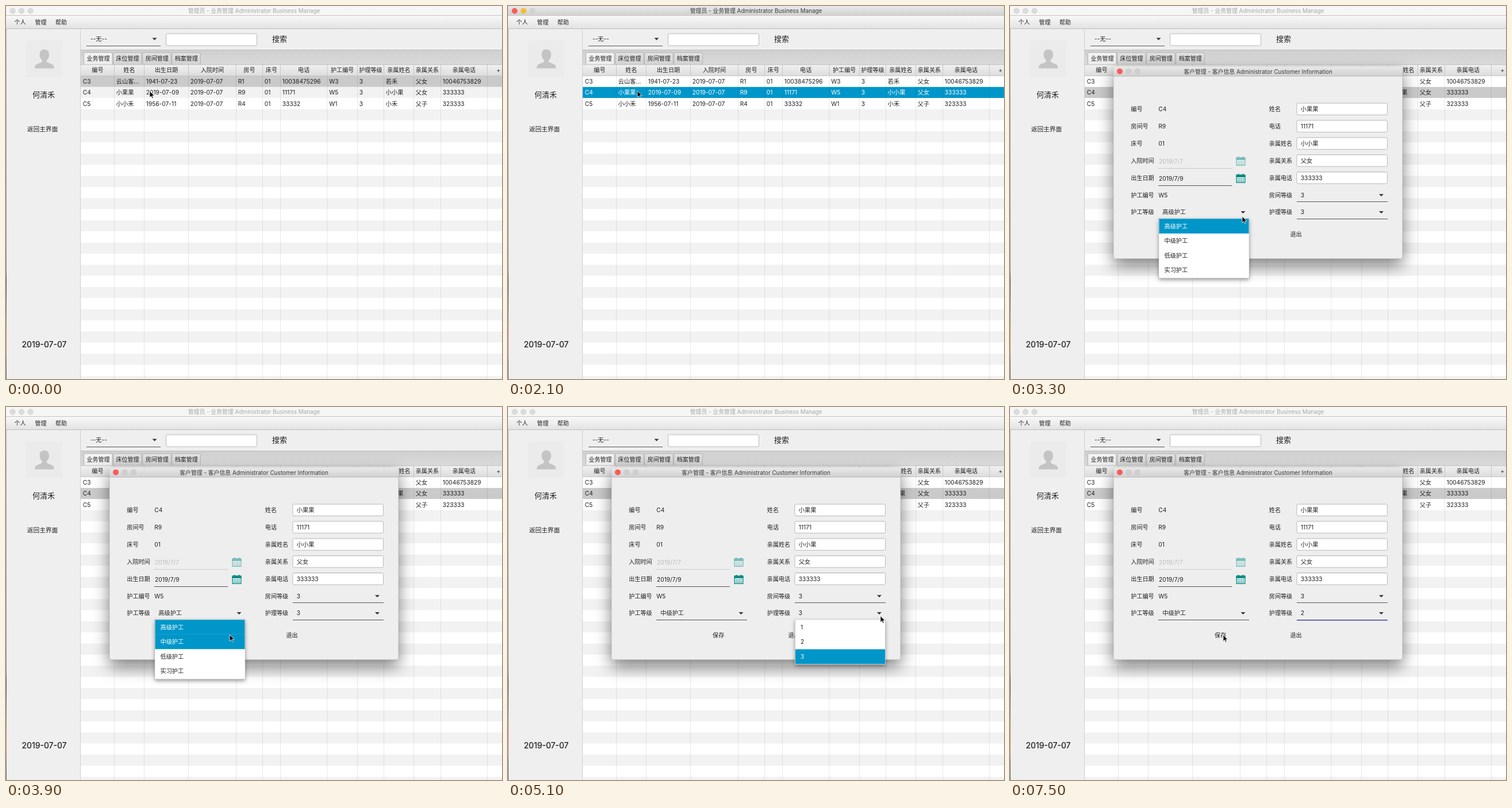
Recreate the animation shown at these times as an HTML page. Size 863 px wide and 649 px high, loop 8 s.

```html
<!DOCTYPE html>
<html lang="zh-CN">
<head>
<meta charset="utf-8">
<title>业务管理</title>
<style>
html, body { margin: 0; width: 100%; height: 100%; overflow: hidden; background: #efefef; }
svg { display: block; width: 863px; height: 649px; }
text { font-family: Inter, "Noto Sans CJK SC", "Noto Sans CJK", sans-serif; white-space: pre; }
</style>
</head>
<body>
<svg id="stage" viewBox="0 0 863 649" xmlns="http://www.w3.org/2000/svg"></svg>
<script>
const INK = '#1f1f1f', BLUE = '#0096c9', GREY = '#cacaca';
const FOCUS = '#3f4aa5', LINE = '#555';

// Drawing helpers; text is placed by its vertical centre.
const rect = (x, y, w, h, fill, extra = '') =>
  `<rect x="${x}" y="${y}" width="${w}" height="${h}" fill="${fill}" ${extra}/>`;
const text = (x, y, str, size = 10.2, extra = '') =>
  `<text x="${x}" y="${y + size * 0.365}" font-size="${size}" ${extra}>${str}</text>`;
const mid = (x, y, str, size, extra = '') =>
  text(x, y, str, size, `text-anchor="middle" ${extra}`);
const dot = (x, y, fill, extra = '') =>
  `<circle cx="${x}" cy="${y}" r="4.7" fill="${fill}" ${extra}/>`;
const arrow = (x, y) => `<path d="M${x - 4} ${y - 2}h8l-4 4z" fill="#333"/>`;
const underline = (x, y, w, id = '', color = LINE) =>
  rect(x, y, w, 1, color, id && `id="${id}"`);
const fade = (id, from, to) =>
  `<linearGradient id="${id}" x2="0" y2="1"><stop stop-color="${from}"/><stop offset="1" stop-color="${to}"/></linearGradient>`;
const field = (x, y, w, h) =>
  rect(x + .5, y + .5, w - 1, h - 1, '#fff', 'rx="2" stroke="#b9b9b9"') +
  rect(x + 1.5, y + 1, w - 3, 1, '#e6e6e6');

const defs = `<defs>
  ${fade('barOn', '#e9e9e9', '#d0d0d0')}
  ${fade('menu', '#f8f8f8', '#e2e2e2')}
  ${fade('tabs', '#cfcfcf', '#dadada')}
  ${fade('tab', '#e2e2e2', '#d2d2d2')}
  ${fade('tabOn', '#f4f4f4', '#ececec')}
  ${fade('head', '#f1f1f1', '#dcdcdc')}
  <linearGradient id="edge" x2="0" y2="1">
    <stop stop-color="#b4b4b4"/><stop offset=".69" stop-color="#8c8c8c"/>
    <stop offset=".72" stop-color="#4a4a4a"/><stop offset=".82" stop-color="#8c8078"/>
    <stop offset=".86" stop-color="#d9764f"/><stop offset=".92" stop-color="#c98a70"/>
    <stop offset=".95" stop-color="#777"/><stop offset="1" stop-color="#666"/>
  </linearGradient>
  <filter id="deep" x="-20%" y="-20%" width="140%" height="150%">
    <feDropShadow dx="0" dy="12" stdDeviation="14" flood-opacity=".5"/>
  </filter>
  <filter id="soft" x="-10%" y="-10%" width="120%" height="130%">
    <feDropShadow dx="0" dy="3" stdDeviation="3.5" flood-opacity=".4"/>
  </filter>
</defs>`;

const titleBar = () =>
  rect(0, 0, 863, 17, '#f6f6f6', 'id="bar"') +
  [11.5, 27, 42.5].map((x, i) => dot(x, 8.5, '#dcdcdc', `id="light${i}" stroke="#cdcdcd" stroke-width=".6"`)).join('') +
  mid(431.5, 8.7, '管理员 - 业务管理 Administrator Business Manage', 9.9, 'id="title"') +
  rect(0, 16, 863, 1, '#c4c4c4') +
  rect(0, 17, 863, 23, 'url(#menu)') + rect(0, 39, 863, 1, '#bdbdbd') +
  text(14.5, 28.5, '个人', 10) + text(50.5, 28.5, '管理', 10) + text(86, 28.5, '帮助', 10);

const sidebar = () =>
  rect(35, 60, 63, 63.5, '#ebebeb') +
  `<path fill="#c4c4c4" d="M50 108.500C50 102 53 101.500 58 99.500C62 98 63 97 63 94.500
    C60 92 58.500 88.500 58.500 84.500C58.500 78.500 62 75.500 66.700 75.500C71.500 75.500 75 78.500 75 84.500
    C75 88.500 73.500 92 70.500 94.500C70.500 97 71.500 98 75.500 99.500C80.500 101.500 83.500 102 83.500 108.500Z"/>` +
  mid(65.500, 154.500, '何清禾', 13) +
  mid(63.500, 214.300, '返回主界面', 10.7) +
  mid(66.500, 589, '2019-07-07', 14.1, 'stroke="#1f1f1f" stroke-width=".2"') +
  rect(129, 40, 1, 609, '#cfcfcf') +
  rect(0, 40, 1, 609, 'url(#edge)');

const toolbar = () =>
  text(147, 57.3, '--无--') + arrow(258.5, 57.500) + underline(140, 69, 129) +
  field(278, 47.500, 159, 22) + mid(476, 57.300, '搜索', 13) +
  rect(130, 76, 733, 26, 'url(#tabs)') + rect(130, 76, 733, 1, '#bcbcbc') +
  ['业务管理', '床位管理', '房间管理', '档案管理'].map((name, i) => {
    const x = 135.500 + i * 51.100;
    return `<path d="M${x} 102v-19q0-2 2-2h45.500q2 0 2 2v19" fill="url(#${i ? 'tab' : 'tabOn'})" stroke="#b2b2b2"/>` +
      mid(x + 25, 91.200, name, 10);
  }).join('');

const cols = [130, 188, 240, 317, 400, 446, 477, 558.500, 611, 657, 709, 756, 837, 876];
const heads = ['编号', '姓名', '出生日期', '入院时间', '房号', '床号', '电话', '护工编号',
  '护理等级', '亲属姓名', '亲属关系', '亲属电话', '+'];
const people = [
  ['C3', '云山客...', '1941-07-23', '2019-07-07', 'R1', '01', '10038475296', 'W3', '3', '若禾', '父女', '10046753829'],
  ['C4', '小果果', '2019-07-09', '2019-07-07', 'R9', '01', '11171', 'W5', '3', '小小果', '父女', '333333'],
  ['C5', '小小禾', '1956-07-11', '2019-07-07', 'R4', '01', '33332', 'W1', '3', '小禾', '父子', '323333']
];
const PITCH = 19.34, TOP = 121.500;
const rowFill = i => i % 2 ? '#f2f2f2' : '#fff';

function table() {
  let out = rect(130, 121, 733, 528, '#fff');
  for (let i = 0; i < 28; i++) {
    out += rect(130, TOP + i * PITCH, 733, PITCH, rowFill(i), `id="row${i}"`);
  }
  cols.slice(1, 13).forEach(x => out += rect(x, TOP, 1, 528, '#000', 'opacity=".085"'));
  people.forEach((cells, i) => {
    const y = 131.300 + i * PITCH;
    out += `<g id="cells${i}">` + cells.map((s, c) => text(cols[c] + 3.800, y, s)).join('') + '</g>';
  });
  out += rect(130, 102, 733, 20, 'url(#head)') + rect(130, 101.500, 733, 1, '#bdbdbd') + rect(130, 121, 733, 1, '#c6c6c6');
  heads.forEach((s, c) => {
    out += mid((cols[c] + cols[c + 1]) / 2 + .4, 111.500, s, 10.1) + rect(cols[c + 1], 102, 1, 19, '#c6c6c6');
  });
  return out;
}

function calendar(x, y, opacity) {
  let out = `<g transform="translate(${x} ${y})" opacity="${opacity}">` +
    rect(.7, 2.200, 14.600, 13.100, '#fff', 'stroke="#078a86" stroke-width="1.400"') +
    rect(0, 1.500, 16, 4.500, '#078a86') + rect(3, 0, 2, 3, '#078a86') + rect(11, 0, 2, 3, '#078a86');
  for (let i = 0; i < 12; i++) out += rect(2.700 + i % 4 * 2.900, 7.500 + (i / 4 | 0) * 2.500, 1.800, 1.500, '#078a86');
  return out + '</g>';
}

function dialog() {
  const left = [['编号', 'C4'], ['房间号', 'R9'], ['床号', '01'], ['入院时间'], ['出生日期'], ['护工编号', 'W5'], ['护工等级']];
  const right = [['姓名', '小果果'], ['电话', '11171'], ['亲属姓名', '小小果'], ['亲属关系', '父女'], ['亲属电话', '333333'], ['房间等级'], ['护理等级']];
  const rowY = i => 179.400 + i * 29.900;
  let out = '<g id="dialog">' +
    rect(180, 105, 503, 335, '#eee', 'rx="4" filter="url(#deep)"') +
    rect(180, 105, 503, 334.500, '#eee', 'rx="4" stroke="#a8a8a8" stroke-width=".6"') +
    '<path d="M180 122v-13q0-4 4-4h495q4 0 4 4v13z" fill="url(#barOn)"/>' +
    rect(180, 121.500, 503, 1, '#b8b8b8') +
    dot(191, 113.600, '#fc5b57', 'stroke="#e2463f" stroke-width=".5"') +
    dot(206.500, 113.600, '#cfcfcf', 'stroke="#bdbdbd" stroke-width=".5"') +
    dot(222, 113.600, '#cfcfcf', 'stroke="#bdbdbd" stroke-width=".5"') +
    mid(431.500, 113.900, '客户管理 - 客户信息 Administrator Customer Information', 9.900, 'fill="#3a3a3a"');
  left.forEach(([label, value], i) => {
    out += text(210.300, rowY(i), label, 10.100) + (value ? text(258.300, rowY(i), value) : '');
  });
  right.forEach(([label, value], i) => {
    out += text(450.800, rowY(i), label, 10.100);
    if (value) out += field(498.500, rowY(i) - 10.900, 158.500, 21.500) + text(505.800, rowY(i), value);
  });
  out += text(259, 270, '2019/7/7', 10.200, 'fill="#bdbdbd"') + underline(258, 282, 128, '', '#c9c9c9') + calendar(393.500, 262, .5) +
    text(259, 300, '2019/7/9') + underline(258, 312, 128) + calendar(393.500, 292, 1) +
    text(265.300, 358.700, '', 10.200, 'id="staff"') + arrow(405.500, 359) + underline(258, 370, 158, 'staffLine') +
    text(505.800, 329.200, '3') + arrow(646, 329.300) + underline(499, 340, 158) +
    text(505.800, 358.700, '', 10.200, 'id="care"') + arrow(646, 359) + underline(499, 370, 158, 'careLine') +
    rect(342.500, 384, 47.500, 27, '#c8c8c8', 'id="save" rx="2"') +
    mid(366.200, 397.500, '保存', 10.100) + mid(497.500, 397.500, '退出', 10.100);
  return out + '</g>';
}

function popup(id, x, items) {
  const h = items.length * 25.600 + 1;
  return `<g id="${id}">` + rect(x, 370, 157, h, '#fff', 'filter="url(#soft)"') +
    rect(x, 370, 157, h, '#fff', 'stroke="#bcbcbc" stroke-width=".8"') +
    items.map((s, i) => rect(x + .5, 370.300 + i * 25.600, 156, 25.600, '#fff', `id="${id}Bg${i}"`) +
      text(x + 9.500, 382.800 + i * 25.500, s, 10.200, `id="${id}Tx${i}"`)).join('') + '</g>';
}

const stage = document.getElementById('stage');
stage.innerHTML = defs + rect(0, 0, 863, 649, '#efefef') + `<g fill="${INK}">` +
  toolbar() + table() + sidebar() + titleBar() + dialog() +
  popup('jobs', 259, ['高级护工', '中级护工', '低级护工', '实习护工']) +
  popup('levels', 499.500, ['1', '2', '3']) + '</g>' +
  `<path id="cursor" d="M0 0V11.200L2.600 8.800L4.400 12.700L6.200 11.900L4.500 8.200H8Z"
    fill="#000" stroke="#fff" stroke-width=".8"/>`;

const el = {};
stage.querySelectorAll('[id]').forEach(e => el[e.id] = e);
const paint = (id, fill) => el[id].setAttribute('fill', fill);
const show = (id, on) => el[id].setAttribute('visibility', on ? 'visible' : 'hidden');

// The pointer jumps from place to place: time, x, y.
const moves = [[0, 250, 148], [900, 147, 98], [1200, 161, 68], [1500, 225, 147.500], [2700, 399, 402],
  [3000, 404, 366], [3600, 389, 396], [4200, 488, 379], [4500, 641, 367], [4800, 648, 363.500],
  [5400, 628, 372], [5700, 574, 406], [6900, 374, 394], [7200, 370.500, 396], [7500, 371, 396.500]];

function light(id, i, on) {
  paint(`${id}Bg${i}`, on ? BLUE : '#fff');
  paint(`${id}Tx${i}`, on ? '#fff' : INK);
}

function focusLine(id, on) {
  el[id].setAttribute('height', on ? 1.600 : 1);
  paint(id, on ? FOCUS : LINE);
}

function render(t) {
  const within = (a, b) => t >= a && t < b;
  const active = within(300, 2400), open = t >= 2400;

  paint('bar', active ? 'url(#barOn)' : '#f6f6f6');
  paint('title', active ? '#3a3a3a' : '#a8a8a8');
  ['#fc5b57', '#f8bc34', '#d2d2d2'].forEach((c, i) => {
    paint('light' + i, active ? c : '#dcdcdc');
    el['light' + i].setAttribute('stroke', active && i < 2 ? c : '#c8c8c8');
  });

  paint('row0', t < 300 ? GREY : rowFill(0));
  paint('row1', active ? BLUE : open ? GREY : rowFill(1));
  paint('cells1', active ? '#fff' : INK);

  show('dialog', open);
  show('save', open && t < 3300);
  el.staff.textContent = t < 4200 ? '高级护工' : '中级护工';
  el.care.textContent = t < 6300 ? '3' : '2';
  focusLine('staffLine', within(4200, 5100));
  focusLine('careLine', t >= 6300);

  show('jobs', within(3300, 4200));
  light('jobs', 0, true);
  light('jobs', 1, t >= 3900);
  show('levels', within(5100, 6300));
  light('levels', 1, t >= 5700);
  light('levels', 2, true);

  const [, x, y] = moves.filter(m => m[0] <= t).pop();
  el.cursor.setAttribute('transform', `translate(${x} ${y})`);
}

function tick() {
  render(performance.now() % 8000);
  requestAnimationFrame(tick);
}
tick();
</script>
</body>
</html>
```
